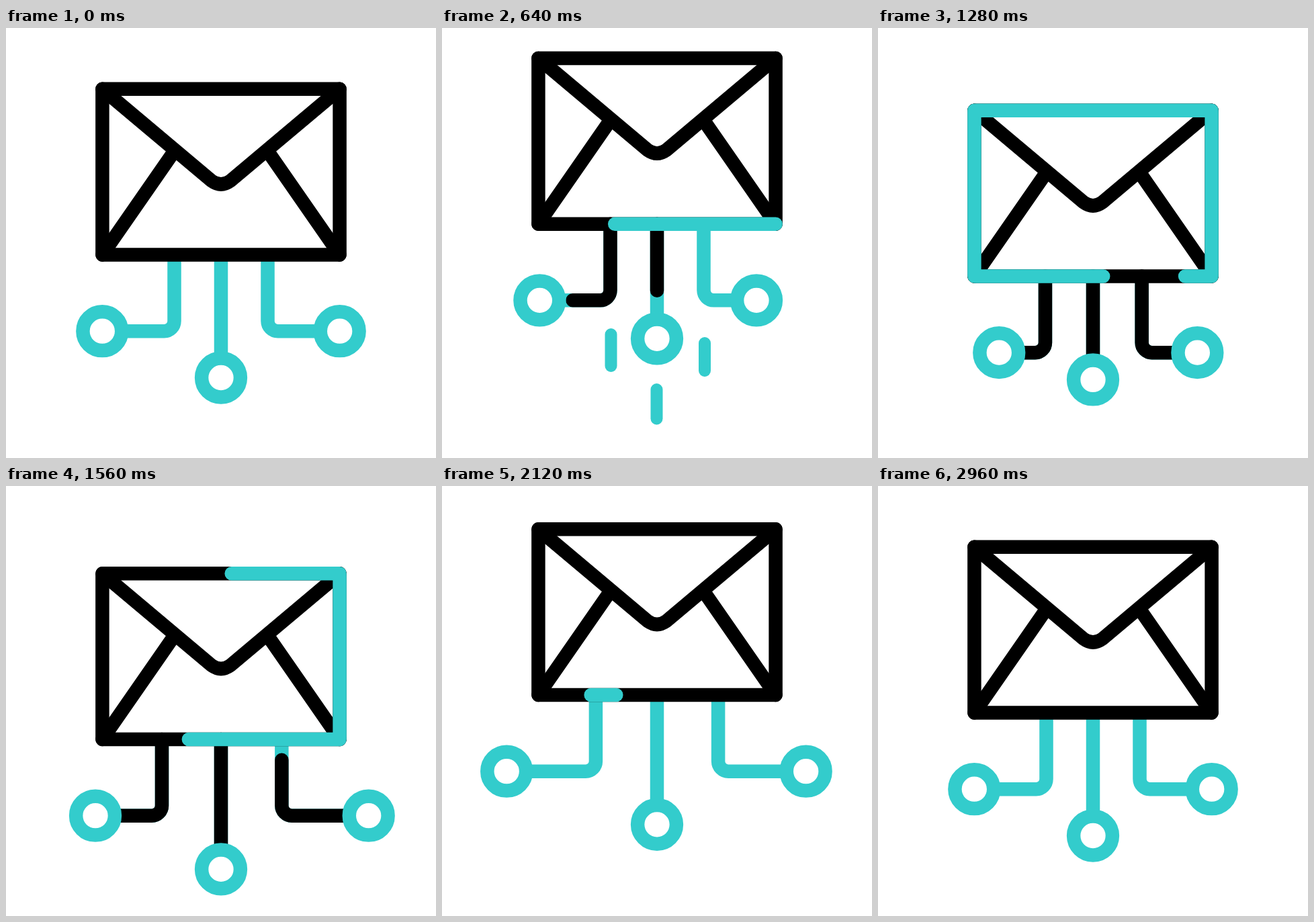
Animation of 640x640 px, one loop 3000 ms. Source, as an HTML page with a canvas:

```html
<!DOCTYPE html>
<html lang="en">
<head>
<meta charset="utf-8">
<title>Mail network</title>
<style>
html, body { margin: 0; width: 100%; height: 100%; overflow: hidden; background: #fff; }
canvas { display: block; width: 640px; height: 640px; }
</style>
</head>
<body>
<canvas id="stage" width="640" height="640"></canvas>
<script>
const LOOP = 3000, STEP = 40;
const CYAN = '#33cccc', BLACK = '#000', W = 20.5;
const BOX = { l: 143.4, r: 496.6, t: 90.8, b: 337.5 };
const SIDE_Y = 451.2, RADIUS = 28.9;
const ctx = document.getElementById('stage').getContext('2d');

const smooth = p => (1 - Math.cos(Math.PI * p)) / 2;
const easeOut = p => 1 - (1 - p) ** 2;

// Moves by `amount` between two times.
const move = (start, end, amount, ease = smooth) => t =>
  amount * ease(Math.min(1, Math.max(0, (t - start) / (end - start))));
const sum = (...moves) => t => moves.reduce((total, m) => total + m(t), 0);

const lift = sum(move(90, 660, -46), move(856, 1381, 85.5),
  move(1677, 2073, -66), move(2310, 2950, 26.5));

// spread: outward shift of the line; reach: extra length; from / to: the black part.
const left = {
  dir: -1,
  spread: sum(move(1190, 1760, 25.5), move(1900, 2760, -25.5)),
  reach: sum(move(556, 1120, -38.5), move(1280, 1860, 64), move(2152, 2582, -25.5)),
  to: move(290, 810, 215),
  from: move(1576, 2136, 215)
};
const right = {
  dir: 1,
  spread: sum(move(1150, 1720, 25.5), move(1900, 2760, -25.5)),
  reach: sum(move(295, 815, -38.5), move(1120, 1636, 64), move(2010, 2600, -25.5)),
  to: move(670, 1230, 215),
  from: move(1422, 1982, 215)
};
const middle = {
  reach: sum(move(430, 970, -37.5), move(1152, 1626, 50.3), move(1900, 2588, -12.8)),
  to: move(325, 895, 170),
  from: move(1556, 2116, 170)
};

// Cyan run around the envelope, measured from the lower right corner.
const around = 2 * (BOX.r - BOX.l + BOX.b - BOX.t);
const drift = move(861, 2034, 275, easeOut);
const head = sum(drift, move(523, 1634, around, easeOut));
const tail = sum(drift, move(1285, 2300, around, easeOut));

const trails = [[251.5, 456, 47, 280], [319.5, 538, 43.5, 295], [391, 469, 41, 310]].map(
  ([x, y, len, start]) => ({
    path: new Path2D(`M${x} ${y}v60`),
    to: move(start, start + 340, len),
    from: move(980, 1240, len)
  }));

function stroke(path, color, from = 0, to = Infinity, width = W, cap = 'round') {
  if (to <= from) return;
  ctx.strokeStyle = color;
  ctx.lineWidth = width;
  ctx.lineCap = cap;
  ctx.setLineDash(to === Infinity ? [] : [to - from, 5000]);
  ctx.lineDashOffset = -from;
  ctx.stroke(path);
}

function wire(path, part, t) {
  stroke(path, CYAN, 0, Infinity, W, 'butt');
  stroke(path, BLACK, part.from(t), part.to(t));
}

function ring(x, y) {
  const path = new Path2D();
  path.arc(x, y, RADIUS, 0, Math.PI * 2);
  ctx.fillStyle = '#fff';
  ctx.fill(path);
  stroke(path, CYAN);
}

function drawSide(side, t) {
  const x = 320 + side.dir * (69.5 + side.spread(t));
  const end = x + side.dir * (107.2 + side.reach(t));
  const path = new Path2D();
  path.moveTo(x, BOX.b);
  path.arcTo(x, SIDE_Y, end, SIDE_Y, 15);
  path.lineTo(end - side.dir * RADIUS, SIDE_Y);
  wire(path, side, t);
  ring(end, SIDE_Y);
}

function drawMiddle(t) {
  const y = 520.5 + middle.reach(t);
  wire(new Path2D(`M320 ${BOX.b}V${y - RADIUS}`), middle, t);
  ring(320, y);
}

const corner = `M${BOX.r} ${BOX.b}`;
const lap = `H${BOX.l}V${BOX.t}H${BOX.r}V${BOX.b}`;
const frame = new Path2D(`${corner}${lap}Z`);
const laps = new Path2D(`${corner}${lap}${lap}`);
const folds = new Path2D(
  `M${BOX.l} ${BOX.t}L306 227.5Q320 237.5 334 227.5L${BOX.r} ${BOX.t}` +
  `M250 184L${BOX.l} ${BOX.b}M390 184L${BOX.r} ${BOX.b}`);

function draw(t) {
  ctx.fillStyle = '#fff';
  ctx.fillRect(0, 0, 640, 640);
  ctx.lineJoin = 'round';
  for (const { path, from, to } of trails) stroke(path, CYAN, from(t), to(t), 18);
  ctx.save();
  ctx.translate(0, lift(t));
  drawSide(left, t);
  drawSide(right, t);
  drawMiddle(t);
  stroke(folds, BLACK);
  stroke(frame, BLACK);
  stroke(laps, CYAN, tail(t), head(t));
  ctx.restore();
}

const start = performance.now();
function tick() {
  const t = (performance.now() - start) % LOOP;
  draw(Math.floor(t / STEP) * STEP);
  requestAnimationFrame(tick);
}
tick();
</script>
</body>
</html>
```
